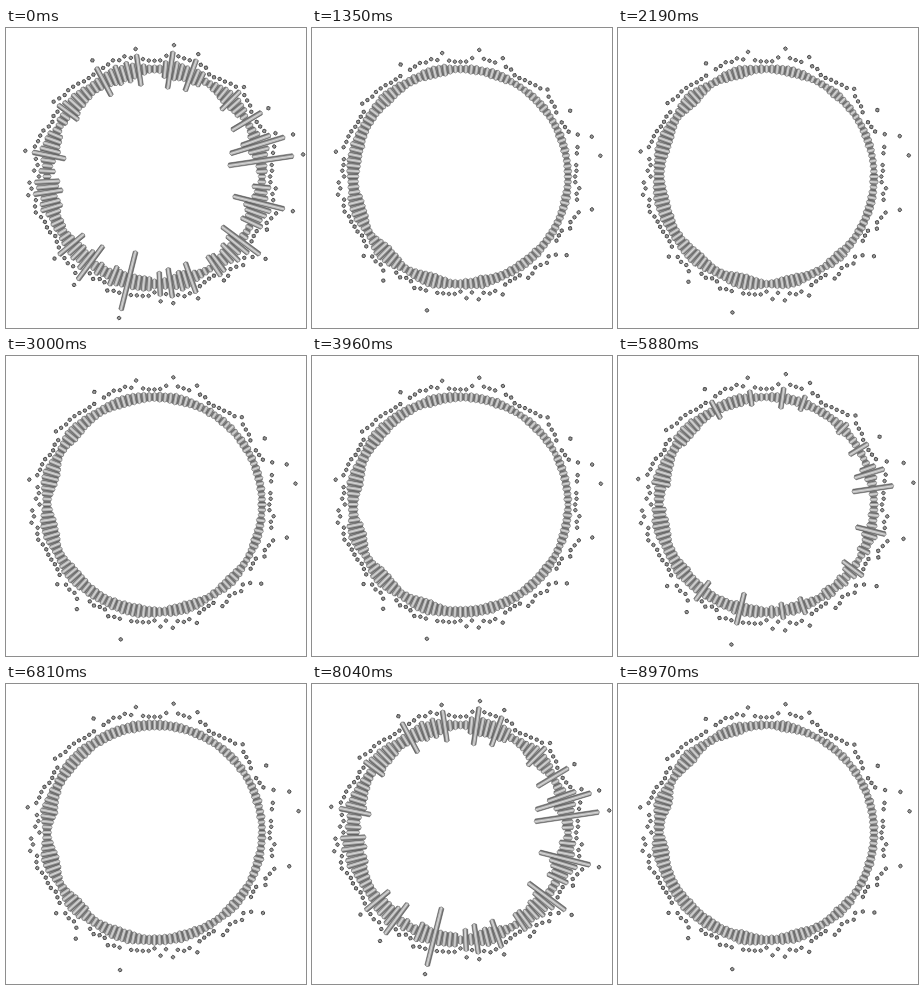
Recreate the animation shown at these times as an HTML page with a canvas. Size 300 by 300 pixels, loop 9000 ms.

```html
<!DOCTYPE html>
<html lang="en">
<head>
<meta charset="utf-8">
<title>Circular sound bars</title>
<style>
html, body { margin: 0; width: 100%; height: 100%; overflow: hidden; background: #fff; }
canvas { display: block; width: 300px; height: 300px; }
</style>
</head>
<body>
<canvas id="stage" width="300" height="300"></canvas>
<script>
const ctx = document.getElementById("stage").getContext("2d");
const LOOP = 9000, STEP = 30, COUNT = 128, RADIUS = 107.5, CENTER = 148.5;
const TURN = 2 * Math.PI / COUNT;

// Seconds at which the music hits.
const beats = [-0.03, 0.55, 1.6, 2.3, 3.2, 4.05, 4.93, 5.7, 6.38, 7.2, 8.02, 8.45];

// The strongest bars, by index clockwise from the top.
const accents = { 3: 20, 21: 20, 26: 31, 29: 36, 37: 29, 45: 25, 69: 32, 77: 22, 100: 19, 118: 19 };

function random(a, b = 0) {
  const v = Math.sin(a * 12.9898 + b * 78.233 + 4.1) * 43758.5453;
  return v - Math.floor(v);
}

// Twelve swellings around the ring, with seeded peaks between the accents.
function reach(i) {
  const swell = 7 - 2.8 * Math.cos(12 * i * TURN);
  return accents[i] || swell + 9 * random(i) ** 4;
}

function quietLength(i, t) {
  const angle = i * TURN;
  const left = 0.5 - 0.5 * Math.sin(angle + 0.3);
  const wave = 0.6 - 0.25 * Math.cos(12 * angle) + 0.15 * Math.sin(i * 0.7 + t * 2);
  const flicker = random(i, Math.floor(t / 0.09));
  return 2.8 + (1 + 4.8 * left) * wave + flicker * 1.2;
}

function barState(i, t) {
  const n = beats.findLastIndex(beat => beat <= t);
  const age = t - beats[n];
  const level = Math.exp(-Math.max(0, age - 0.1) / 0.15);
  const gain = 0.85 + 0.15 * random(i, n);
  const half = Math.max(quietLength(i, t), reach(i) * gain * level);
  const cap = Math.max(half + 3, reach(i) * (1.1 - 0.32 * age) + 3.5);
  return { half, cap };
}

function shades(...colors) {
  const gradient = ctx.createLinearGradient(-2.6, 0, 2.6, 0);
  colors.forEach((color, i) => gradient.addColorStop(i / (colors.length - 1), color));
  return gradient;
}
const metal = shades("#484848", "#8c8c8c", "#d8d8d8", "#b4b4b4", "#505050");

// A rod along the radius, with bevelled ends.
function rod(from, to, width, bevel) {
  const w = width / 2;
  ctx.beginPath();
  ctx.moveTo(-w, from + bevel);
  ctx.lineTo(0, from);
  ctx.lineTo(w, from + bevel);
  ctx.lineTo(w, to - bevel);
  ctx.lineTo(0, to);
  ctx.lineTo(-w, to - bevel);
  ctx.closePath();
  ctx.fill();
  ctx.stroke();
}

function drawBar({ half, cap }) {
  ctx.fillStyle = metal;
  ctx.strokeStyle = "#5a5a5a";
  ctx.lineWidth = 0.5;
  rod(-RADIUS - half, -RADIUS + half, 4.8, 1.2);

  ctx.fillStyle = "#999";
  ctx.strokeStyle = "#4a4a4a";
  ctx.lineWidth = 0.9;
  rod(-RADIUS - cap - 1.9, -RADIUS - cap + 1.9, 3.4, 1.2);
}

function draw(now) {
  const t = Math.floor(now % LOOP / STEP) * STEP / 1000;
  ctx.fillStyle = "#fff";
  ctx.fillRect(0, 0, 300, 300);
  for (let i = 0; i < COUNT; i++) {
    ctx.save();
    ctx.translate(CENTER, CENTER);
    ctx.rotate(i * TURN);
    drawBar(barState(i, t));
    ctx.restore();
  }
}

const start = performance.now();
function tick() {
  draw(performance.now() - start);
  requestAnimationFrame(tick);
}
tick();
</script>
</body>
</html>
```
